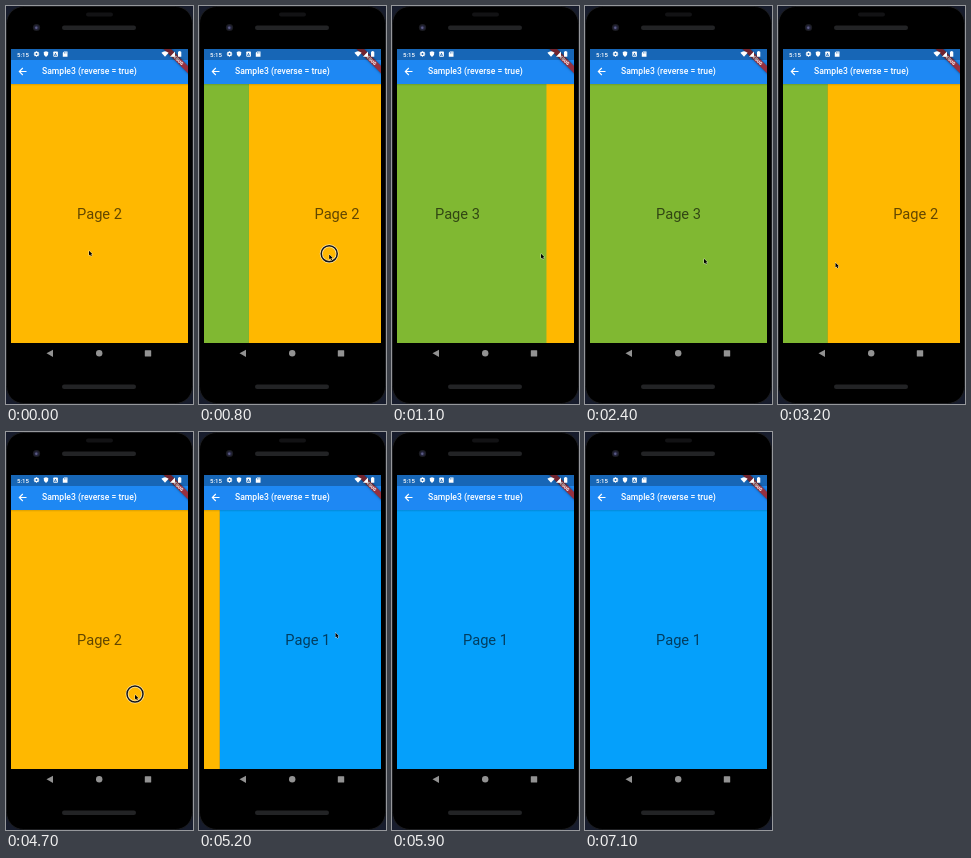
Recreate the animation shown at these times as an HTML page with a canvas. Size 187x398 px, loop 7200 ms.

```html
<!DOCTYPE html>
<html lang="en">
<head>
<meta charset="utf-8">
<title>Reverse page view</title>
<style>
html, body { margin: 0; width: 100%; height: 100%; overflow: hidden; background: #000; }
canvas { display: block; width: 187px; height: 398px; }
</style>
</head>
<body>
<canvas id="stage"></canvas>
<script>
const W = 187, H = 398, LOOP = 7200, STEP = 100;
const screenBox = { x: 5, y: 43, w: 177, h: 314 };
const pageTop = 78, pageBottom = 337;
const canvas = document.getElementById('stage');
const dpr = window.devicePixelRatio || 1;
canvas.width = Math.round(W * dpr);
canvas.height = Math.round(H * dpr);
const c = canvas.getContext('2d');

// Position 0 is page 1; higher pages sit further left.
const pages = [
  { label: 'Page 1', color: '#05a0fb' },
  { label: 'Page 2', color: '#ffb800' },
  { label: 'Page 3', color: '#80b832' }
];
const swipes = [
  { press: 500, start: 600, release: 900, from: 1, to: 2, drag: 60 },
  { press: 2600, start: 2700, release: 3066, from: 2, to: 1, drag: -62 },
  { press: 4650, start: 4710, release: 4908, from: 1, to: 0, drag: -54 }
];
const settleTau = 140;

// Pointer path: time, x, y
const path = [
  [0, 83, 244], [500, 87, 246], [600, 88, 247], [900, 145, 248],
  [1100, 149, 247], [1700, 146, 249], [2400, 119, 252], [2700, 119, 254],
  [3066, 58, 256], [3200, 57.5, 256], [3700, 70, 258], [4400, 125, 261],
  [4700, 129, 262], [4908, 75, 255], [5000, 86, 242], [5200, 136.5, 200],
  [5600, 196, 160]
];

const lerp = (a, b, p) => a + (b - a) * p;
const smooth = p => p * p * (3 - 2 * p);

function pointerAt(t) {
  const i = path.findIndex(k => k[0] > t);
  if (i < 0) return null;
  const a = path[i - 1], b = path[i];
  const p = smooth((t - a[0]) / (b[0] - a[0]));
  return [lerp(a[1], b[1], p), lerp(a[2], b[2], p)];
}

function positionAt(t) {
  let position = 1;
  for (const s of swipes) {
    if (t < s.start) break;
    const dragged = s.from + s.drag / screenBox.w;
    if (t < s.release) {
      position = lerp(s.from, dragged, smooth((t - s.start) / (s.release - s.start)));
    } else {
      const rest = (s.to - dragged) * Math.exp(-(t - s.release) / settleTau);
      position = Math.abs(rest) < 0.003 ? s.to : s.to - rest;
    }
  }
  return position;
}

function rect(x, y, w, h, color) {
  c.fillStyle = color;
  c.fillRect(x, y, w, h);
}

function rounded(x, y, w, h, r, fill, stroke) {
  c.beginPath();
  c.roundRect(x, y, w, h, r);
  if (fill) { c.fillStyle = fill; c.fill(); }
  if (stroke) { c.strokeStyle = stroke; c.stroke(); }
}

function disc(x, y, r, color) {
  c.beginPath();
  c.arc(x, y, r, 0, Math.PI * 2);
  c.fillStyle = color;
  c.fill();
}

function ring(x, y, r, width, color) {
  c.beginPath();
  c.arc(x, y, r, 0, Math.PI * 2);
  c.lineWidth = width;
  c.strokeStyle = color;
  c.stroke();
}

function poly(points, color) {
  c.beginPath();
  points.forEach(([x, y]) => c.lineTo(x, y));
  c.closePath();
  c.fillStyle = color;
  c.fill();
}

function text(value, x, y, size, weight, color, align = 'left') {
  c.font = `${weight} ${size}px Roboto, sans-serif`;
  c.textAlign = align;
  c.fillStyle = color;
  c.fillText(value, x, y);
}

function drawPhone() {
  rect(0, 0, W, H, '#171c2c');
  c.lineWidth = 1;
  rounded(0.5, 0.5, W - 1, H - 1, 17, '#000', '#1b1c1f');
  rounded(80, 6.5, 27, 4, 2, '#121214');
  disc(30.5, 21.5, 3.6, '#1b1c22');
  disc(30.5, 21.7, 2.4, '#272740');
  disc(30.3, 21.8, 1.2, '#5c5c86');
  rounded(56, 19.5, 74, 4.5, 2.2, '#222325');
  rounded(56, 378.5, 74, 4.5, 2.2, '#222325');
}

function drawPages(position) {
  c.save();
  c.beginPath();
  c.rect(screenBox.x, pageTop, screenBox.w, pageBottom - pageTop);
  c.clip();
  pages.forEach((page, i) => {
    const x = screenBox.x + (position - i) * screenBox.w;
    if (Math.abs(position - i) >= 1) return;
    rect(x, pageTop, screenBox.w + 0.5, pageBottom - pageTop, page.color);
    text(page.label, x + screenBox.w / 2, 212.5, 14.64, 400, 'rgba(0,0,0,.62)', 'center');
  });
  c.restore();
}

function drawAppBar() {
  rect(5, 43, 177, 35, '#1e88f3');
  c.strokeStyle = '#fff';
  c.lineWidth = 1.1;
  c.beginPath();
  c.moveTo(20.5, 65.5);
  c.lineTo(13.5, 65.5);
  c.moveTo(16.8, 62);
  c.lineTo(13.3, 65.5);
  c.lineTo(16.8, 69);
  c.stroke();
  text('Sample3 (reverse = true)', 36, 68.4, 8.6, 500, '#fff');
  const shade = c.createLinearGradient(0, 78, 0, 80);
  shade.addColorStop(0, 'rgba(0,0,0,.14)');
  shade.addColorStop(1, 'rgba(0,0,0,0)');
  rect(5, 78, 177, 2, shade);
}

function drawBanner() {
  c.save();
  c.beginPath();
  c.rect(screenBox.x, screenBox.y, screenBox.w, screenBox.h);
  c.clip();
  c.translate(182, 43);
  c.rotate(Math.PI / 4);
  c.shadowColor = 'rgba(0,0,0,.5)';
  c.shadowBlur = 2.5 * dpr;
  rect(-20, 12, 40, 5.2, '#96303f');
  c.shadowColor = 'transparent';
  text('DEBUG', 0, 16.2, 4.4, 900, '#fff', 'center');
  c.restore();
}

// The translucent system bar lies over the app and its banner.
function drawStatusBar() {
  rect(5, 43, 177, 11, 'rgba(0,0,0,.25)');
  text('5:15', 11, 50.5, 6.05, 500, '#fff');
  ring(30.5, 48, 1.7, 1.5, '#fff');
  for (let i = 0; i < 8; i++) {
    const a = i * Math.PI / 4;
    disc(30.5 + 2.5 * Math.cos(a), 48 + 2.5 * Math.sin(a), 0.45, '#fff');
  }
  poly([[40, 45.2], [42.3, 46.1], [42, 49], [40, 51], [38, 49], [37.7, 46.1]], '#fff');
  rounded(47.3, 45.5, 4.6, 5.2, 0.7, '#fff');
  text('A', 49.6, 49.8, 4.4, 700, '#1766b6', 'center');
  poly([[58.1, 45.4], [61.5, 45.4], [61.5, 50.8], [56.8, 50.8], [56.8, 46.7]], '#fff');
  rect(58.2, 46.2, 0.6, 1.3, '#1766b6');
  rect(59.7, 46.2, 0.6, 1.3, '#1766b6');
  c.beginPath();
  c.moveTo(159, 50.7);
  c.lineTo(155.4, 46.7);
  c.quadraticCurveTo(159, 43.7, 162.6, 46.7);
  c.closePath();
  c.fillStyle = '#fff';
  c.fill();
  poly([[164, 50.7], [169, 45.4], [169, 50.7]], '#fff');
  rounded(172, 45.6, 3.3, 5.2, 0.4, '#fff');
  rect(173, 45, 1.3, 0.8, '#fff');
}

function drawNavBar() {
  rect(5, 337, 177, 20, '#000');
  poly([[40.5, 347.3], [47, 343.7], [47, 351]], '#929292');
  disc(93.2, 347.3, 3.2, '#929292');
  rounded(138.8, 344.2, 6.4, 6.3, 0.5, '#929292');
}

function drawPointer(t) {
  const point = pointerAt(t);
  if (!point) return;
  const [x, y] = point;
  if (swipes.some(s => t >= s.press && t < s.release)) {
    ring(x, y, 8, 3, 'rgba(255,255,255,.65)');
    ring(x, y, 8, 1.5, '#161616');
  }
  c.save();
  c.translate(x, y + 0.7);
  c.scale(0.8, 0.8);
  c.beginPath();
  [[0, 0], [0, 6], [1.4, 4.8], [2.4, 7], [3.5, 6.5], [2.6, 4.4], [4.4, 4.3]]
    .forEach(p => c.lineTo(...p));
  c.closePath();
  c.lineJoin = 'round';
  c.lineWidth = 1;
  c.strokeStyle = 'rgba(255,255,255,.75)';
  c.stroke();
  c.fillStyle = '#000';
  c.fill();
  c.restore();
}

function draw(t) {
  c.setTransform(dpr, 0, 0, dpr, 0, 0);
  drawPhone();
  drawPages(positionAt(t));
  drawAppBar();
  drawBanner();
  drawStatusBar();
  drawNavBar();
  drawPointer(t);
}

const began = performance.now();
function tick() {
  const elapsed = Math.max(0, performance.now() - began) % LOOP;
  draw(Math.floor(elapsed / STEP) * STEP);
  requestAnimationFrame(tick);
}
tick();
</script>
</body>
</html>
```
